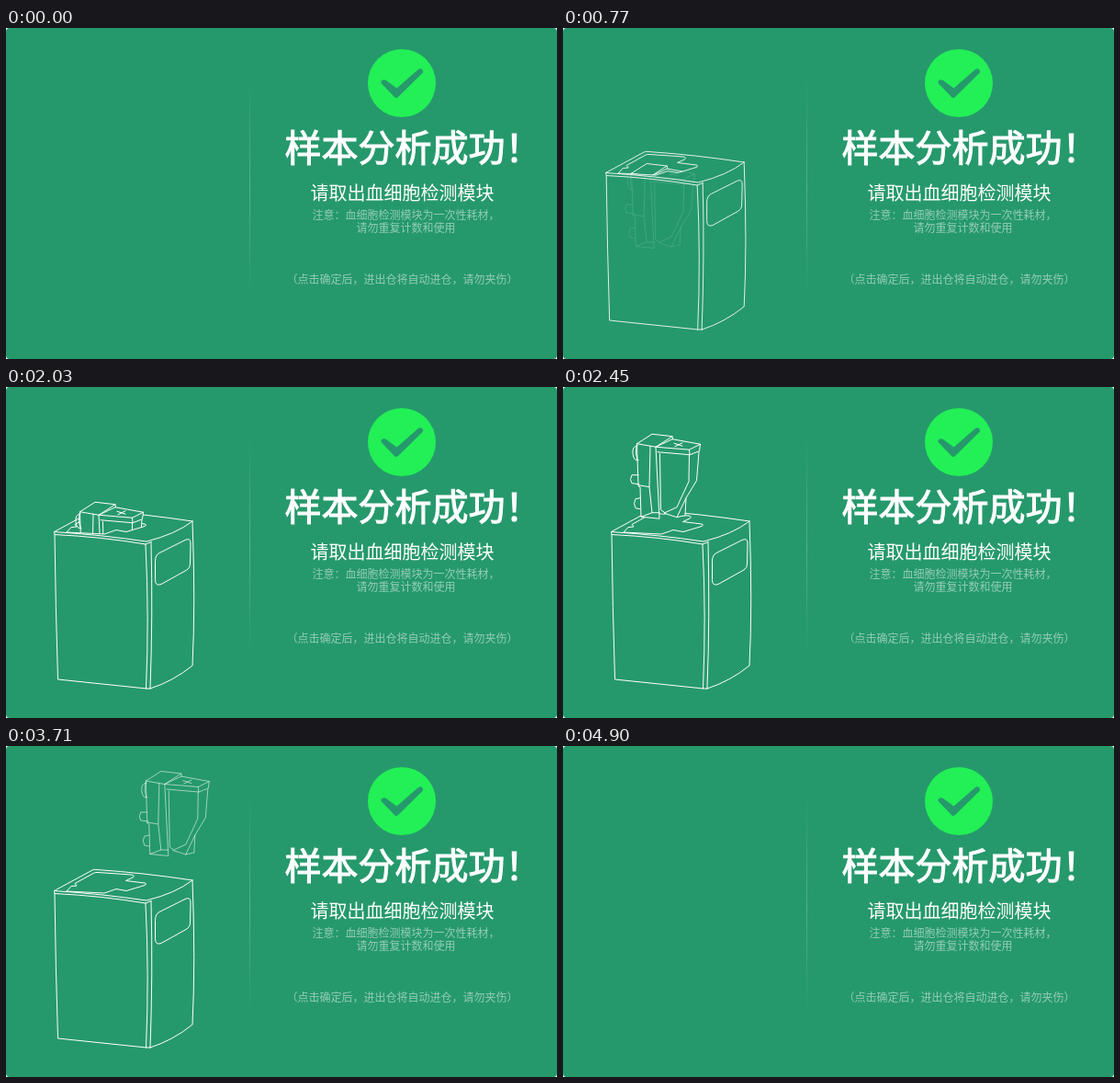
These frames come from a looping animation (600 px wide and 360 px high, 5.25 s). An HTML page with a canvas:

```html
<!DOCTYPE html>
<html lang="zh-CN">
<head>
<meta charset="utf-8">
<title>样本分析成功</title>
<style>
  html, body { margin: 0; width: 100%; height: 100%; overflow: hidden; background: #fff; }
  svg, canvas { position: absolute; left: 0; top: 0; width: 600px; height: 360px; }
  text { font-family: "Noto Sans CJK SC", "Noto Sans CJK", sans-serif; fill: #fff; }
  .title { font-size: 40px; stroke: #fff; stroke-width: 1.1px; }
  .sub { font-size: 20px; }
  .note { font-size: 12px; fill-opacity: .5; }
</style>
</head>
<body>
<svg viewBox="0 0 600 360">
  <defs>
    <linearGradient id="fade" x1="0" y1="0" x2="0" y2="1">
      <stop offset="0" stop-color="#fff" stop-opacity="0"/>
      <stop offset=".5" stop-color="#fff" stop-opacity=".22"/>
      <stop offset="1" stop-color="#fff" stop-opacity="0"/>
    </linearGradient>
  </defs>
  <rect width="600" height="360" rx="4" fill="#26996c"/>
  <rect x="265" y="55" width="1" height="236" fill="url(#fade)"/>
  <circle cx="431" cy="60" r="37" fill="#22f056"/>
  <path fill="#26996c" d="M409 60.500Q407.500 58.500 409.500 57Q411.500 55.500 414 57L425.500 65.500L449 45Q451.500 43.500 453.500 45.500Q455 47.500 453 49.500L427 75Q425 77 423 75Z"/>
  <text class="title" x="303.500" y="145">样本分析成功！</text>
  <text class="sub" x="331.500" y="187">请取出血细胞检测模块</text>
  <text class="note" x="333.500" y="208">注意：血细胞检测模块为一次性耗材，</text>
  <text class="note" x="381.500" y="222">请勿重复计数和使用</text>
  <text class="note" x="305.500" y="277.500">（点击确定后，进出仓将自动进仓，请勿夹伤）</text>
</svg>
<canvas id="stage" width="600" height="360"></canvas>
<script>
const ctx = document.getElementById('stage').getContext('2d');
const GREEN = '#26996c';
const LOOP = 5250, STEP = 70;

const shape = d => new Path2D(d);

const boxBack = shape(
  'M52.500 157.500L94 135Q96 134 99 134.500Q150 138 203 146' +
  'M66 158L71 152.500L77 152L75 149.500L95 138.500Q97 137 100 137.500L137 140Q141 141 138 143L130.500 146.500L151 149Q154 150 151 151.500');

const frontFill = shape(
  'M52.500 157.500L66 158L107 160L120 155.500L131 157.500L151 151.500L203 146' +
  'Q206.500 235 203 303Q182 320 157 328L153 328L56.500 318Z');

const frontLines = shape(
  'M66 158L107 160L120 155.500L131 157.500L151 151.500' +           // slot lip
  'M52.500 157.500Q105 161 153 168Q185 160 203 146' +               // lid edge
  'M52.500 157.500L53 160.500Q104 163 152 171L158 168.500' +
  'M53 160.500Q54 240 56.500 318L153 328L157 328' +
  'M152 171Q156 250 152.500 328' +
  'M158 168.500Q160 250 157 328' +
  'M203 146Q206.500 235 203 303Q182 320 157 328' +
  'M162.500 189Q162.500 183 167 180.500L195 166.500Q201 163.500 201 170L200.500 192Q200.500 197 196 199.500L169 214.500Q162.500 217 162.500 210Z');

const moduleFill = shape(
  'M80 38L97 27L120 30L149.500 38.500L148.500 46L145.500 78L134 97L133 116L124 118L105 113L105 119.500L85 117.500Z');

const moduleLines = shape(
  'M80.500 38L97 27.500L119 30L119.500 33M80.500 38L101 41.500L119 30' +
  'M80.500 38L82 84L84 85L85 117.500L105 119.500L101 41.500' +
  'M82 83L94 85L95 40.500M94 85L97 113L85 117.500M97 113L105 113' +
  'M81 40Q75 41 76 49Q77 57 82 56M80 40Q78 48 81 56' +             // knobs
  'M82 72L75 72Q72 77 75 81L83 82' +
  'M84 97L79 98Q76 103 79 108L84 109' +
  'M101 41.500L119 33L149.500 38.500L137.500 44.500L101 41.500M149.500 38.500L148.500 46L138 50L103 47M137.500 44.500L138 50' +
  'M121 37.500L130 40.500M130 37L122 41' +
  'M105.500 49L106.500 110L111 113L124 107L137 79L137.500 50' +
  'M148 47L145.500 78L134 97L133 116L124 118L110 113.500M134 97L124 118');

// cubic-bezier(.25, .1, .25, 1)
function ease(x) {
  if (x <= 0) return 0;
  if (x >= 1) return 1;
  const curve = (s, a, b) => 3 * a * s * (1 - s) ** 2 + 3 * b * s * s * (1 - s) + s ** 3;
  let lo = 0, hi = 1;
  for (let i = 0; i < 24; i++) {
    const mid = (lo + hi) / 2;
    if (curve(mid, .25, .25) < x) lo = mid; else hi = mid;
  }
  return curve(lo, .1, 1);
}

const span = (t, start, length) => Math.min(1, Math.max(0, (t - start) / length));

function paint(x, y, alpha, lines, fill) {
  if (alpha <= 0) return;
  ctx.save();
  ctx.translate(x, y);
  ctx.globalAlpha = alpha;
  if (fill) ctx.fill(fill);
  ctx.stroke(lines);
  ctx.restore();
}

function draw(t) {
  const enter = ease(span(t, 100, 1200));
  const lift = ease(span(t, 1850, 1200));
  const away = span(t, 3350, 800);
  const x = -40 * (1 - enter);
  const boxAlpha = enter * (1 - ease(span(t, 4650, 250)));

  ctx.clearRect(0, 0, 600, 360);
  paint(x, 0, boxAlpha, boxBack);
  paint(x + 96 * ease(away), 120 * (1 - lift), enter * (1 - away), moduleLines, moduleFill);
  paint(x, 0, boxAlpha, frontLines, frontFill);
}

ctx.fillStyle = GREEN;
ctx.strokeStyle = '#fff';
ctx.lineWidth = 1;
ctx.lineJoin = ctx.lineCap = 'round';

const begin = performance.now();
function tick() {
  const t = (performance.now() - begin) % LOOP;
  draw(Math.floor(t / STEP) * STEP);
  requestAnimationFrame(tick);
}
tick();
</script>
</body>
</html>
```
